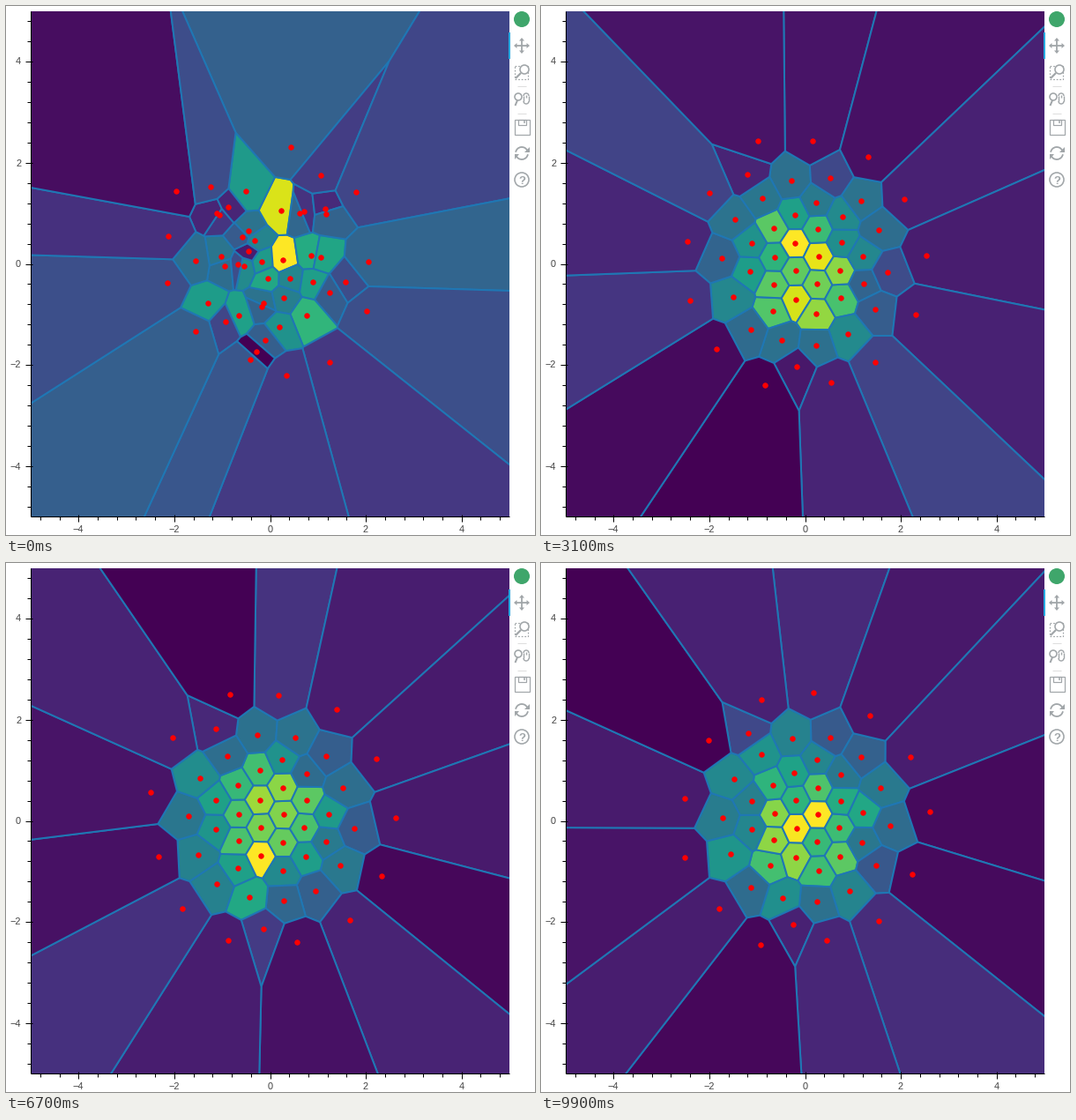
Recreate the animation shown at these times as a matplotlib script. Size 600 by 600 pixels, loop 10000 ms.

```python
import numpy as np
import matplotlib.pyplot as plt
from matplotlib.animation import FuncAnimation
from matplotlib.collections import PolyCollection
from matplotlib.patches import Arc, Circle, Rectangle

FRAMES, SAMPLES = 100, 3000
PT = 0.72  # points per pixel at 100 dpi
ORIGIN = np.array([299.0, 292.0])
SCALE = np.array([54.3, -57.3])
GREY = "#a1a6a9"


def to_px(p):
    return ORIGIN + np.asarray(p) * SCALE


def polar(r, deg):
    a = np.radians(deg)
    return np.stack([r * np.cos(a), r * np.sin(a)], -1)


def ring_of(n, r, phase):
    return polar(r, phase - 360 * np.arange(n) / n)


def calm_layout():
    """A hexagonal core inside two rings, with two cells wedged between them."""
    col, row = np.mgrid[-4:5, -4:5]
    x = -0.18 + 0.466 * col
    y = -0.14 + 0.54 * (row + 0.5 * (col % 2))
    core = np.hypot(x - 0.055, y - 0.035) < 1.26
    return np.concatenate([
        np.stack([x[core], y[core]], 1),
        ring_of(14, 1.68, 99),
        polar(np.array([2.18, 2.04]), np.array([123, -96])),
        ring_of(13, 2.53, 85.7),
    ])


def clip(poly, a, b, c):
    """Keep the part of a polygon where a*x + b*y <= c."""
    out = []
    x0, y0 = poly[-1]
    d0 = a * x0 + b * y0 - c
    for x1, y1 in poly:
        d1 = a * x1 + b * y1 - c
        if (d0 <= 0) != (d1 <= 0):
            t = d0 / (d0 - d1)
            out.append((x0 + t * (x1 - x0), y0 + t * (y1 - y0)))
        if d1 <= 0:
            out.append((x1, y1))
        x0, y0, d0 = x1, y1, d1
    return out


def voronoi(seeds):
    pts = seeds.tolist()
    cells = []
    for i, (px, py) in enumerate(pts):
        poly = [(-30, -30), (30, -30), (30, 30), (-30, 30)]
        for j, (qx, qy) in enumerate(pts):
            if i != j:
                c = (qx * qx + qy * qy - px * px - py * py) / 2
                poly = clip(poly, qx - px, qy - py, c)
        cells.append(to_px(poly))
    return cells


def relax():
    """Lloyd steps on fresh normal samples, drawn gently to the calm layout."""
    rng = np.random.default_rng(7)
    calm = calm_layout()
    n = len(calm)
    seeds = 0.85 * calm + rng.normal(scale=0.22, size=calm.shape)
    states = []
    for k in range(FRAMES):
        cloud = rng.normal(size=(SAMPLES, 2))
        owner = ((cloud[:, None] - seeds) ** 2).sum(2).argmin(1)
        count = np.bincount(owner, minlength=n)
        states.append((seeds, count))
        total = np.stack([np.bincount(owner, cloud[:, d], n) for d in (0, 1)], 1)
        mean = np.where(count[:, None] > 0,
                        total / np.maximum(count, 1)[:, None], seeds)
        seeds = mean + min(0.3, 0.02 * k) * (calm - mean)
    return states


fig = plt.figure(figsize=(6, 6), dpi=100, facecolor="white")
ax = fig.add_axes([0, 0, 1, 1])
ax.set(xlim=(0, 600), ylim=(600, 0))
ax.axis("off")


def line(xs, ys, color="black", w=1):
    ax.plot(xs, ys, color=color, lw=w * PT, solid_capstyle="butt", zorder=5)


def ring(x, y, r, w=1.6):
    ax.add_patch(Circle((x, y), r, fill=False, ec=GREY, lw=w * PT))


def arc(x, y, size, start, stop, w=1.4):
    ax.add_patch(Arc((x, y), size, size, theta1=start, theta2=stop, ec=GREY, lw=w * PT))


def box(x, y, w, h, **kw):
    ax.add_patch(Rectangle((x, y), w, h, fill=False, ec=GREY, lw=1.2 * PT, **kw))


def draw_axes():
    line([27.5, 27.5], [5.5, 578.5])
    line([27.5, 570.5], [578.5, 578.5])
    font = dict(family="Liberation Sans", size=11 * PT, color="#444444", va="baseline")
    for k in range(-12, 13):
        x, y = np.floor(to_px((k * 0.4, k * 0.4))) + 0.5
        major = k % 5 == 0
        out, into = (6, 2) if major else (4, 0)
        line([x, x], [578.5 - into, 578.5 + out])
        line([27.5 - out, 27.5 + into], [y, y])
        if major:
            label = str(k * 2 // 5).replace("-", "\u2212")
            ax.text(x, 597, label, ha="center", **font)
            ax.text(17, y + 4, label, ha="right", **font)


def draw_toolbar():
    ax.add_patch(Circle((585, 15), 9, color="#3fa66b", lw=0))
    line([571, 571], [30, 60], "#26aae1", 2)
    for y in (90.5, 121.5):
        line([580, 590], [y, y], "#dddddd")

    # pan
    line([578, 592], [45, 45], GREY, 1.8)
    line([585, 585], [38, 52], GREY, 1.8)
    for dx, dy in ((1, 0), (-1, 0), (0, 1), (0, -1)):
        tip = np.array([585 + 9 * dx, 45 + 9 * dy])
        back = tip - 3.5 * np.array([dx, dy])
        side = 3 * np.array([-dy, dx])
        ax.fill(*np.array([tip, back + side, back - side]).T, color=GREY, lw=0)

    # box zoom
    box(577, 68, 15, 15, ls=(0, (1.5, 1.5)))
    ax.add_patch(Circle((588, 72), 5, fc="white", ec=GREY, lw=1.6 * PT))
    line([584, 578], [76, 82], GREY, 2.2)

    # wheel zoom
    ring(581, 103, 4)
    line([580, 577.5], [107, 113], GREY, 2)
    arc(590, 102, 6, 180, 360)
    arc(590, 108, 6, 0, 180)
    for x in (587, 593):
        line([x, x], [102, 108], GREY, 1.4)
    line([590, 590], [101, 104], GREY, 1.4)

    # save
    box(577, 128.5, 16.5, 17)
    box(581, 128.5, 9, 6)
    line([587.5, 587.5], [130, 133], GREY, 1.5)

    # reset
    arc(585, 167, 14, 190, 335, 1.8)
    arc(585, 167, 14, 10, 155, 1.8)
    ax.fill([593.5, 593.5, 588], [160, 166, 166], color=GREY, lw=0)
    ax.fill([576.5, 576.5, 582], [174, 168, 168], color=GREY, lw=0)

    # help
    ring(585, 197, 8)
    ax.text(585, 201.5, "?", family="Liberation Sans", size=13 * PT, weight="bold",
            color=GREY, ha="center", va="baseline")


draw_axes()
draw_toolbar()

frame = Rectangle((27.5, 5.5), 543, 573, transform=ax.transData)
cells = PolyCollection([], edgecolors="#1f77b4", linewidths=2 * PT, zorder=2)
ax.add_collection(cells, autolim=False)
cells.set_clip_path(frame)
dots, = ax.plot([], [], "o", color="red", ms=5.4 * PT, mew=PT, zorder=3)

STATES = relax()


def update(k):
    seeds, count = STATES[k]
    cells.set_verts(voronoi(seeds))
    cells.set_facecolor(plt.cm.viridis((count - count.min()) / np.ptp(count)))
    dots.set_data(*to_px(seeds).T)
    return cells, dots


anim = FuncAnimation(fig, update, frames=FRAMES, interval=100, repeat=True,
                     repeat_delay=0, blit=False)
plt.show()
```
